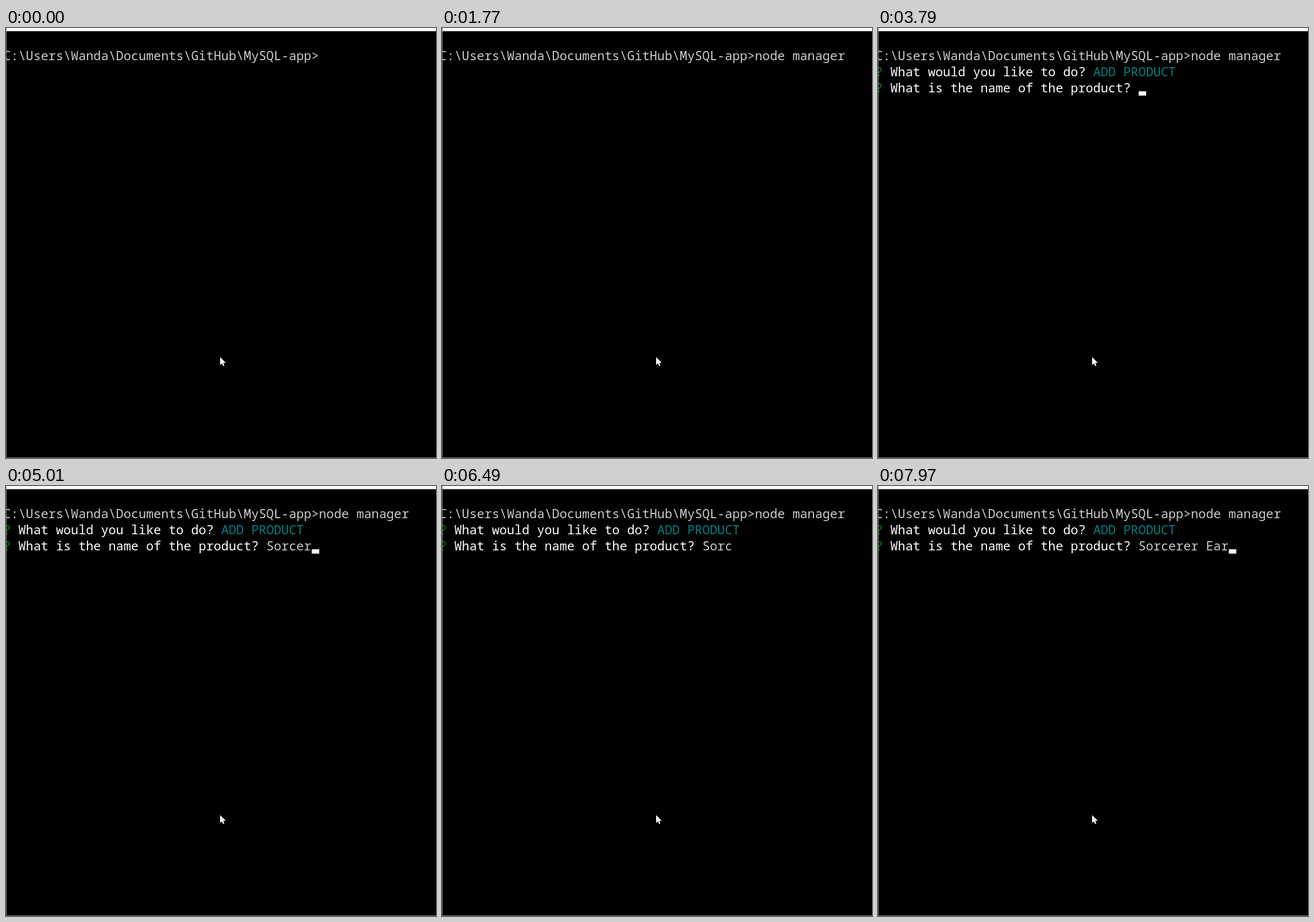
An HTML page that plays this animation: 749x748 px, repeating every 8 s.

```html
<!DOCTYPE html>
<html lang="en">
<head>
<meta charset="utf-8">
<title>Terminal session</title>
<style>
  html, body { margin: 0; width: 100%; height: 100%; overflow: hidden; background: #000; }
  svg { display: block; }
  text {
    font: 500 21.82px "Noto Sans Mono", "DejaVu Sans Mono", monospace;
    font-variant-ligatures: none;
    white-space: pre;
  }
</style>
</head>
<body>
<svg width="749" height="748" viewBox="0 0 749 748">
  <rect width="749" height="748" fill="#000"/>
  <clipPath id="inside"><rect x="1" y="6" width="748" height="741"/></clipPath>
  <g clip-path="url(#inside)">
    <g id="lines"></g>
    <rect id="caret" width="13" height="7.5" fill="#fff"/>
  </g>
  <rect width="749" height="5" fill="#fff"/>
  <path d="M0 5.5H749M.5 0V747.5H749" fill="none" stroke="#808080"/>
  <path d="M373 572.5V586.2L376.1 583.3L378.2 588L380.4 587L378.4 582.6H382.8Z" fill="#fff"/>
</svg>
<script>
const LOOP = 8000;
const COL = 13.09, ROW = 28, LEFT = -4.1, BASE = 56;
const BEARING = -0.6;
const GREY = '#ccc', WHITE = '#fff', TEAL = '#008080', GREEN = '#008000';

const PROMPT = 'C:\\Users\\Wanda\\Documents\\GitHub\\MySQL-app>';
const COMMAND = 'node manager';
const PRODUCT = 'Sorcerer Ear';
const CHOICES = ['VIEW ALL', 'VIEW LOW', 'ADD INVENTORY', 'ADD PRODUCT', 'REMOVE PRODUCT', 'EXIT'];

// A line is a list of [text, colour] spans.
const question = label => [['? ', GREEN], [label + ' ', WHITE]];
const shell = typed => [[PROMPT + typed, GREY]];
const answered = () => [shell(COMMAND), [...question('What would you like to do?'), ['ADD PRODUCT', TEAL]]];

const screens = {
  prompt: typed => [shell(typed)],
  wait: () => [shell(COMMAND), []],
  menu: typed => [
    shell(COMMAND),
    question('What would you like to do?'),
    ...CHOICES.map((name, i) =>
      [[`  ${i + 1}) ${name}`, i === (typed || 1) - 1 ? TEAL : GREY]]),
    [['  Answer: ' + typed, GREY]]
  ],
  ask: typed => [...answered(), [...question('What is the name of the product?'), [typed, GREY]]],
  redraw: answered
};

const timeline = [];
const add = (time, screen, typed = '', caret = true) => timeline.push({ time, screen, typed, caret });
const type = (screen, text, start, counts) =>
  counts.forEach((n, i) => add(start + i * 120, screen, text.slice(0, n)));

add(0, 'prompt', '', false);
type('prompt', COMMAND, 140, [0, 1, 2]);
add(630, 'prompt', 'nod');
type('prompt', COMMAND, 780, [4, 5, 7, 8, 9, 11, 12]);
add(1620, 'wait');
add(1770, 'wait', '', false);
add(2270, 'wait');
add(2390, 'menu');
add(2800, 'menu', '', false);
add(3300, 'menu');
add(3420, 'menu', '4', false);
add(3790, 'ask');
add(3910, 'ask', '', false);
type('ask', PRODUCT, 4410, [0, 1, 2, 3, 5, 6]);
add(5260, 'ask', 'Sorcer ');
add(5510, 'ask', 'Sorcer ', false);
type('ask', PRODUCT, 5880, [6, 5]);
add(6120, 'redraw', '', false);
add(6240, 'ask', 'Sorc');
add(6490, 'ask', 'Sorc', false);
add(6740, 'ask', 'Sorcer');
type('ask', PRODUCT, 6990, [7, 8]);
add(7360, 'ask', 'Sorcerer ');
add(7480, 'ask', 'Sorcerer E', false);
add(7730, 'ask', 'Sorcerer Ea');
add(7850, 'redraw', '', false);
add(7970, 'ask', PRODUCT);

const lineGroup = document.getElementById('lines');
const caretBox = document.getElementById('caret');

function svgNode(tag, attributes, parent) {
  const node = document.createElementNS('http://www.w3.org/2000/svg', tag);
  for (const name in attributes) node.setAttribute(name, attributes[name]);
  return parent.appendChild(node);
}

function draw({ screen, typed, caret }) {
  const lines = screens[screen](typed);
  lineGroup.replaceChildren();
  let column = 0;
  lines.forEach((spans, row) => {
    column = 0;
    for (const [text, fill] of spans) {
      const x = LEFT + BEARING + column * COL;
      svgNode('text', { x, y: BASE + row * ROW, fill }, lineGroup).textContent = text;
      column += text.length;
    }
  });
  caretBox.setAttribute('x', LEFT + column * COL);
  caretBox.setAttribute('y', BASE - 1.9 + (lines.length - 1) * ROW);
  caretBox.setAttribute('visibility', caret ? 'visible' : 'hidden');
}

let shown;
const started = performance.now();
function tick() {
  const time = (performance.now() - started) % LOOP;
  const step = timeline.findLast(entry => entry.time <= time);
  if (step !== shown) draw(shown = step);
  requestAnimationFrame(tick);
}
tick();
</script>
</body>
</html>
```
